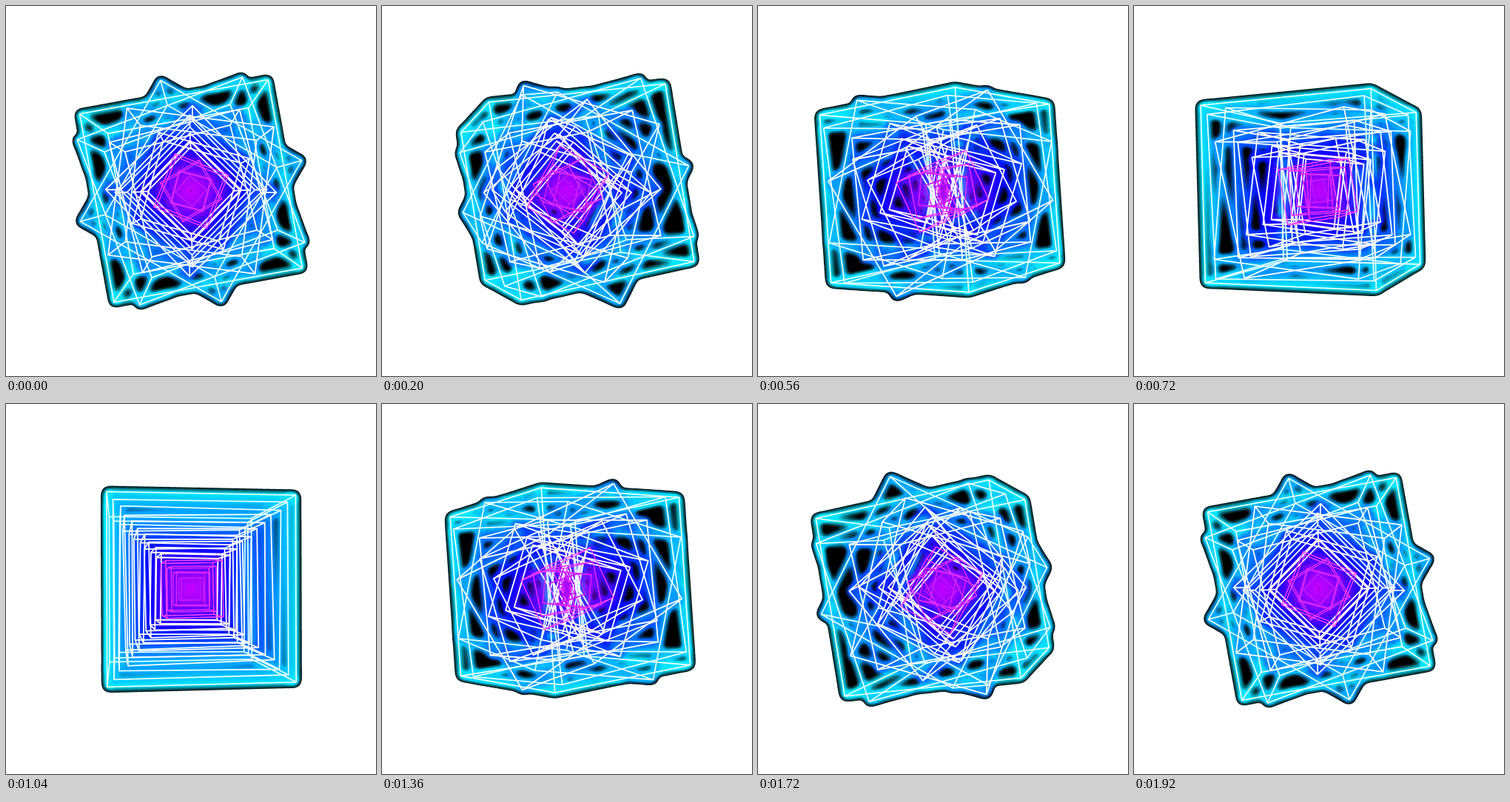
An HTML page for the animation above (1960 ms loop, 500 px wide and 500 px high).

```html
<!DOCTYPE html>
<html>
<head>
<meta charset="utf-8">
<style>
  html, body { margin: 0; width: 100%; height: 100%; overflow: hidden; background: #fff; }
  svg { display: block; width: 100vw; height: 100vh; }
  path { stroke-linejoin: round; }
</style>
</head>
<body>
<svg viewBox="0 0 500 500">
  <defs>
    <filter id="halo" filterUnits="userSpaceOnUse" x="0" y="0" width="500" height="500"
            color-interpolation-filters="sRGB">
      <feGaussianBlur stdDeviation="4.5" result="soft"/>
      <feComponentTransfer in="soft" result="rim">
        <feFuncR type="linear" slope="0"/>
        <feFuncG type="linear" slope="0"/>
        <feFuncB type="linear" slope="0"/>
        <feFuncA type="linear" slope="40" intercept="-1.9"/>
      </feComponentTransfer>
      <feComponentTransfer in="soft" result="glow">
        <feFuncA type="linear" slope="4" intercept="-0.18"/>
      </feComponentTransfer>
      <feMerge>
        <feMergeNode in="rim"/>
        <feMergeNode in="glow"/>
      </feMerge>
    </filter>
  </defs>
  <g id="solid" fill="#000"></g>
  <g id="glow" fill="none" stroke-width="3" filter="url(#halo)"></g>
  <g id="lines" fill="none"></g>
</svg>
<script>
const STEP = 40, FRAMES = 49;
const FOCAL = 763, DISTANCE = 6.9;
// widest twist of each cube in degrees, from the largest to the smallest
const TWISTS = [10.3, 20.7, -29.6, 82.7, 14.3, 44, -44, 74, -44, -44.5, 68, 30, -15, 50, 20];
const COUNT = TWISTS.length;

// corner bits: 1 = x, 2 = y, 4 = z
const FACES = [[0, 1, 3, 2], [4, 5, 7, 6], [0, 1, 5, 4], [2, 3, 7, 6], [0, 2, 6, 4], [1, 3, 7, 5]];
const rad = degrees => degrees * Math.PI / 180;

function addPath(group, attributes) {
  const path = document.createElementNS('http://www.w3.org/2000/svg', 'path');
  for (const name in attributes) path.setAttribute(name, attributes[name]);
  document.getElementById(group).append(path);
  return path;
}

const cubes = TWISTS.map((twist, i) => {
  const hue = 186 + 7.1 * i;
  const inner = i >= 10;
  const stroke = inner ? `hsl(${300 - (i - 10) * 5},100%,${64 - (i - 10) * 3}%)`
                       : i < 3 ? '#e4ffff' : '#fff';
  return {
    size: 1 - i / COUNT,
    twist: rad(twist),
    paths: [
      addPath('solid', {}),
      addPath('glow', { stroke: `hsl(${hue},100%,50%)` }),
      addPath('lines', { stroke, 'stroke-width': inner ? 1 : 1.8 })
    ]
  };
});

function corner(bits, size, turn, twist) {
  const [x, y, z] = [1, 2, 4].map(bit => bits & bit ? size : -size);
  const depth = z * Math.cos(turn) - x * Math.sin(turn);
  const scale = FOCAL / (DISTANCE - depth);
  const px = (x * Math.cos(turn) + z * Math.sin(turn)) * scale;
  const py = y * scale;
  const c = Math.cos(twist), s = Math.sin(twist);
  return [250 + px * c + py * s, 250 - px * s + py * c];
}

function area(points) {
  return points.reduce((sum, [x, y], i) => {
    const [nx, ny] = points[(i + 1) % points.length];
    return sum + x * ny - nx * y;
  }, 0);
}

// All faces wind the same way so that the filled shape has no holes.
function outline(size, turn, twist) {
  const corners = Array.from({ length: 8 }, (_, bits) => corner(bits, size, turn, twist));
  return FACES.map(face => {
    const points = face.map(k => corners[k]);
    if (area(points) < 0) points.reverse();
    return 'M' + points.map(p => p.map(v => v.toFixed(2)).join()).join('L') + 'Z';
  }).join('');
}

function draw(ms) {
  const u = Math.floor(ms / STEP) % FRAMES / (FRAMES - 1);
  const turn = Math.PI * u;
  const swing = (1 + Math.cos(2 * Math.PI * u)) / 2;
  for (const { size, twist, paths } of cubes) {
    const d = outline(size, turn, twist * swing);
    paths.forEach(path => path.setAttribute('d', d));
  }
}

const start = performance.now();
function tick() {
  draw(performance.now() - start);
  requestAnimationFrame(tick);
}
tick();
</script>
</body>
</html>
```
